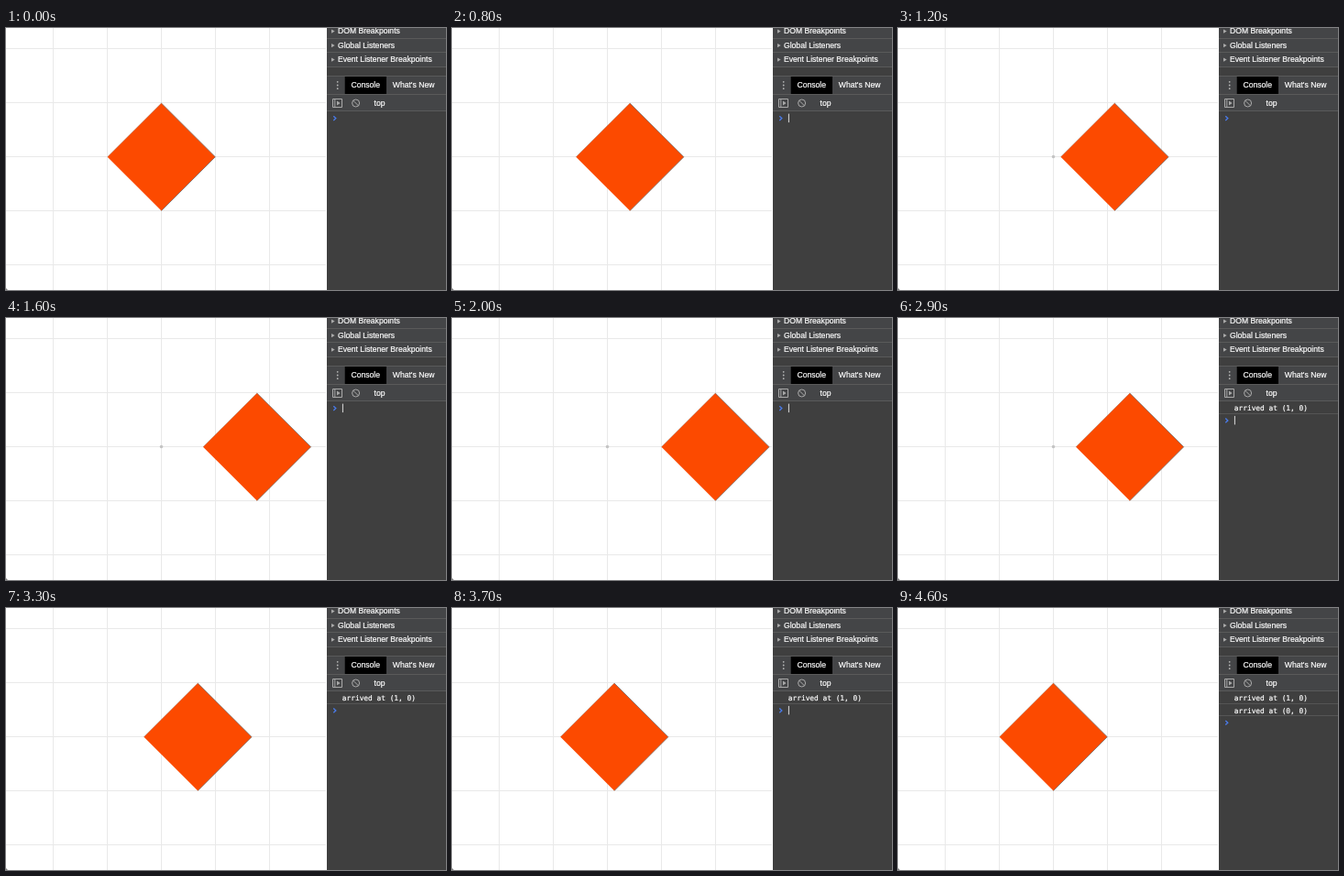
These frames come from a looping animation (480 by 286 pixels, 4.7 s). An HTML page:

```html
<!DOCTYPE html>
<html lang="en">
<head>
<meta charset="utf-8">
<style>
  html, body { margin: 0; width: 100%; height: 100%; overflow: hidden; background: #fff; }
  svg { display: block; width: 480px; height: 286px; }
  text { fill: #fff; stroke: #fff; stroke-width: .2; white-space: pre; }
  .ui { font: 8.6px "Liberation Sans", Arial, sans-serif; }
  .log { font: 7.83px "DejaVu Sans Mono", monospace; }
</style>
</head>
<body>
<svg viewBox="0 0 480 286">
  <rect width="480" height="286" fill="#fff"/>
  <path id="grid" fill="none" stroke="#e9e9e9"/>
  <path d="M0 283.5Q0.5 285.5 2.5 286H0Z" fill="#777"/>
  <circle cx="169.5" cy="140.5" r="1.8" fill="#c4c4c4"/>
  <g id="diamond">
    <path d="M0-58.6L58.8 0L0 58.8L-58.8 0Z" fill="#fc4a00"/>
    <path d="M-58.8 0L0-58.6" stroke="#8a6a5a" stroke-width=".4"/>
    <path d="M0-58.6L58.8 0L0 58.8" fill="none" stroke="#77706e" stroke-width=".8"/>
  </g>

  <rect x="350" width="130" height="286" fill="#3f3f3f"/>
  <rect x="350" width="130" height="42" fill="#444547"/>
  <rect x="350" y="53" width="130" height="37" fill="#444547"/>
  <path d="M350 11.5H480M350 26.5H480M350 42.5H480M350 52.5H480M350 72.5H480M350 90.5H480" stroke="#5a5a5a" fill="none"/>
  <g id="sections" class="ui"></g>

  <rect x="369.7" y="53" width="45.3" height="19" fill="#000"/>
  <g fill="#b5b5b5">
    <circle cx="361.7" cy="58.8" r=".9"/>
    <circle cx="361.7" cy="62.5" r=".9"/>
    <circle cx="361.7" cy="66.2" r=".9"/>
  </g>
  <g class="ui">
    <text x="376.5" y="65.3">Console</text>
    <text x="421.8" y="65.3">What's New</text>
    <text x="401.5" y="84.5">top</text>
  </g>
  <g fill="none" stroke="#aaa">
    <path d="M356.5 77.5H366.5V86.5H356.5ZM358.8 77.5V86.5"/>
    <path d="M361 79.6L364.6 82L361 84.4Z" fill="#aaa" stroke="none"/>
    <circle cx="381.6" cy="82" r="4"/>
    <path d="M378.8 79.2L384.4 84.8"/>
  </g>

  <g id="logs" class="log"></g>
  <g id="prompt">
    <path d="M-1.3-2.3L1.2 0L-1.3 2.3" transform="translate(358.6 0)" fill="none" stroke="#4a7bea" stroke-width="1.3"/>
    <path id="cursor" d="M367.4-5V4.5" stroke="#ddd"/>
  </g>
</svg>
<script>
const LOOP = 4700, STEP = 100;
const LEAVE = 145, RETURN = 2140, TRAVEL = 1970;
const BLINK = 1066, BLINK_ON = 492;
const ORIGIN = 169.5, UNIT = 118, ROW = 13.3;
const el = id => document.getElementById(id);

let grid = "";
for (let i = 0; i < 5; i++) {
  grid += `M${51.5 + 59 * i} 0V286M0 ${22.5 + 59 * i}H349`;
}
el("grid").setAttribute("d", grid);

el("sections").innerHTML = ["DOM Breakpoints", "Global Listeners", "Event Listener Breakpoints"]
  .map((label, i) => {
    const y = 3.6 + 15.5 * i;
    return `<path d="M355 ${y - 2.2}L358.7 ${y}L355 ${y + 2.2}Z" fill="#aaa"/>
      <text x="362" y="${y + 2.7}">${label}</text>`;
  }).join("");

el("logs").innerHTML = ["arrived at (1, 0)", "arrived at (0, 0)"]
  .map((message, i) => `<g><text x="366.8" y="${101.2 + ROW * i}">${message}</text>
    <path d="M350 ${104.5 + 13 * i}H480" stroke="#555"/></g>`).join("");
const logs = [...el("logs").children];

const progress = (t, start) => Math.max(0, Math.min(1, (t - start) / TRAVEL));
const smooth = u => u * u * u * (10 - 15 * u + 6 * u * u);
const show = (node, on) => node.setAttribute("visibility", on ? "visible" : "hidden");

function draw(t) {
  const out = progress(t, LEAVE);
  const back = progress(t, RETURN);
  const x = ORIGIN + UNIT * (smooth(out) - smooth(back));
  el("diamond").setAttribute("transform", `translate(${x} 140.7)`);

  const arrived = (out === 1) + (back === 1);
  logs.forEach((log, i) => show(log, i < arrived));
  el("prompt").setAttribute("transform", `translate(0 ${98.6 + ROW * arrived})`);

  const phase = t - BLINK_ON;
  show(el("cursor"), phase >= 0 && phase % BLINK < BLINK / 2);
}

const begin = performance.now();
function tick() {
  const t = (performance.now() - begin) % LOOP;
  draw(Math.floor(t / STEP) * STEP);
  requestAnimationFrame(tick);
}
tick();
</script>
</body>
</html>
```
